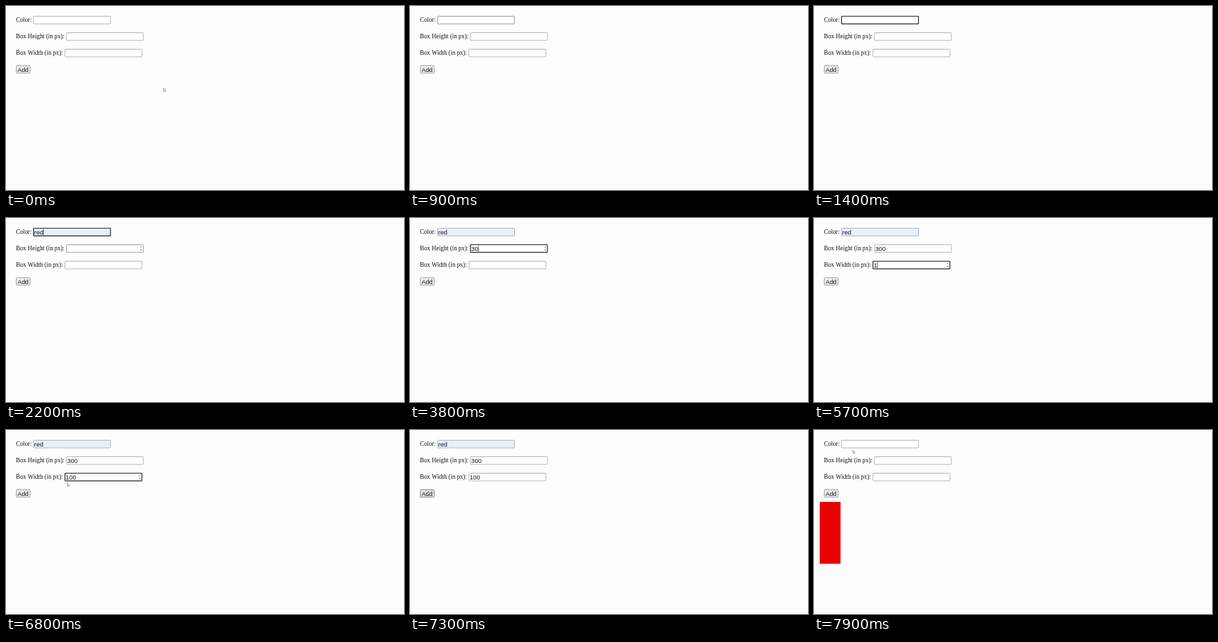
Recreate the animation shown at these times as an HTML page with a canvas. Size 600 by 279 pixels, loop 8000 ms.

```html
<!DOCTYPE html>
<html lang="en">
<head>
<meta charset="utf-8">
<title>Box form</title>
<style>
  html, body { margin: 0; width: 100%; height: 100%; overflow: hidden; background: #fdfdfd; }
  canvas { display: block; }
</style>
</head>
<body>
<canvas id="stage" width="600" height="279"></canvas>
<script>
const ctx = document.getElementById('stage').getContext('2d');
const LOOP = 8000, STEP = 100;
const SERIF = '9.3px "Liberation Serif", serif';
const SANS = '9.4px "Liberation Sans", sans-serif';

// All times are in steps of 100 ms. keys: when each character is typed;
// blink: steps at which the caret toggles, beginning with "on".
const SUBMIT = 74;
const fields = [
  { label: 'Color:', x: 41, y: 15, text: 'red', keys: [18, 19, 20],
    hover: [9, 22], focus: [12, 26], blink: [12, 14, 18], fill: 20 },
  { label: 'Box Height (in px):', x: 90.6, y: 40, text: '300', keys: [33, 38, 39],
    hover: [22, 41], focus: [26, 51], blink: [26, 29, 30, 31, 33], spinner: true },
  { label: 'Box Width (in px):', x: 88.4, y: 65, text: '100', keys: [57, 59, 61],
    hover: [50, 68], focus: [51, 72], blink: [52, 63], spinner: true }
];

// Pointer paths: [step, x, y], held after the last point until "until".
const paths = [
  { until: 9, points: [[0, 237, 124], [4, 97, 84], [5, 97, 84], [8, 64, 29]] },
  { until: 50, points: [[41, 101, 56], [45, 101, 56], [48, 102, 86], [49, 102, 80]] },
  { until: 80, points: [[68, 92, 80], [71, 45, 91], [73, 26, 93], [75, 26, 93], [79, 58, 30]] }
];

const within = ([from, to], step) => step >= from && step < to;

function write(text, x, y, font) {
  ctx.font = font;
  ctx.fillStyle = '#111';
  ctx.fillText(text, x, y);
}

function polygon(points, fill, stroke) {
  ctx.beginPath();
  points.forEach(([x, y]) => ctx.lineTo(x, y));
  ctx.closePath();
  ctx.fillStyle = fill;
  ctx.fill();
  if (stroke) {
    ctx.strokeStyle = stroke;
    ctx.lineWidth = 0.7;
    ctx.stroke();
  }
}

function frame(x, y, w, h, fill, stroke, line) {
  ctx.beginPath();
  ctx.roundRect(x, y, w, h, 0.8);
  ctx.fillStyle = fill;
  ctx.fill();
  ctx.strokeStyle = stroke;
  ctx.lineWidth = line;
  ctx.stroke();
}

function drawField(field, step) {
  const { x, y } = field;
  const sent = step >= SUBMIT;
  const focused = within(field.focus, step);
  const hovered = within(field.hover, step);
  const typed = sent ? '' : field.text.slice(0, field.keys.filter(k => k <= step).length);
  const filled = !sent && step >= field.fill;

  write(field.label, 15, y + 9.4, SERIF);
  frame(x + 0.5, y + 0.5, 116, 11.6, filled ? '#e8f0fe' : '#fff',
    focused ? '#1c1c1c' : hovered ? '#8c8c8c' : '#aaa', focused ? 1.2 : 0.9);
  write(typed, x + 1.6, y + 9.6, SANS);

  if (focused && field.blink.filter(b => b <= step).length % 2) {
    const caret = x + 1.8 + ctx.measureText(typed).width;
    ctx.fillRect(caret, y + 1.5, 0.6, 9.5);
  }
  if (field.spinner && (focused || hovered)) {
    const sx = x + 113.2;
    polygon([[sx - 1.2, y + 4.6], [sx, y + 2.9], [sx + 1.2, y + 4.6]], '#666');
    polygon([[sx - 1.2, y + 8], [sx, y + 9.7], [sx + 1.2, y + 8]], '#666');
  }
}

function pointerAt(step) {
  const path = paths.find(p => within([p.points[0][0], p.until], step));
  if (!path) return null;
  const next = path.points.findIndex(p => p[0] >= step);
  if (next < 0) return path.points.at(-1).slice(1);
  const b = path.points[next], a = path.points[next - 1] || b;
  const k = a === b ? 0 : (step - a[0]) / (b[0] - a[0]);
  return [a[1] + (b[1] - a[1]) * k, a[2] + (b[2] - a[2]) * k];
}

function drawPointer([x, y]) {
  const arrow = [[0.5, 0.5], [0.5, 5.2], [1.6, 4.3], [2.4, 5.9], [3.2, 5.5], [2.5, 4], [3.8, 3.8]];
  polygon(arrow.map(([dx, dy]) => [x + dx, y + dy]), '#fff', '#777');
}

function draw(now) {
  const step = Math.floor((now % LOOP) / STEP);
  ctx.fillStyle = '#fdfdfd';
  ctx.fillRect(0, 0, 600, 279);
  fields.forEach(field => drawField(field, step));

  const overButton = within([72, 76], step);
  frame(15.5, 90.5, 20.8, 11.4, overButton ? '#e6e6e6' : '#efefef', overButton ? '#777' : '#999', 0.9);
  write('Add', 17.4, 99.6, SANS);

  if (step >= SUBMIT) {
    ctx.fillStyle = '#ea0000';
    ctx.fillRect(8.7, 109, 31.3, 93.8);
  }
  const pointer = pointerAt(step);
  if (pointer) drawPointer(pointer);
  requestAnimationFrame(() => draw(performance.now() - start));
}

const start = performance.now();
draw(0);
</script>
</body>
</html>
```
